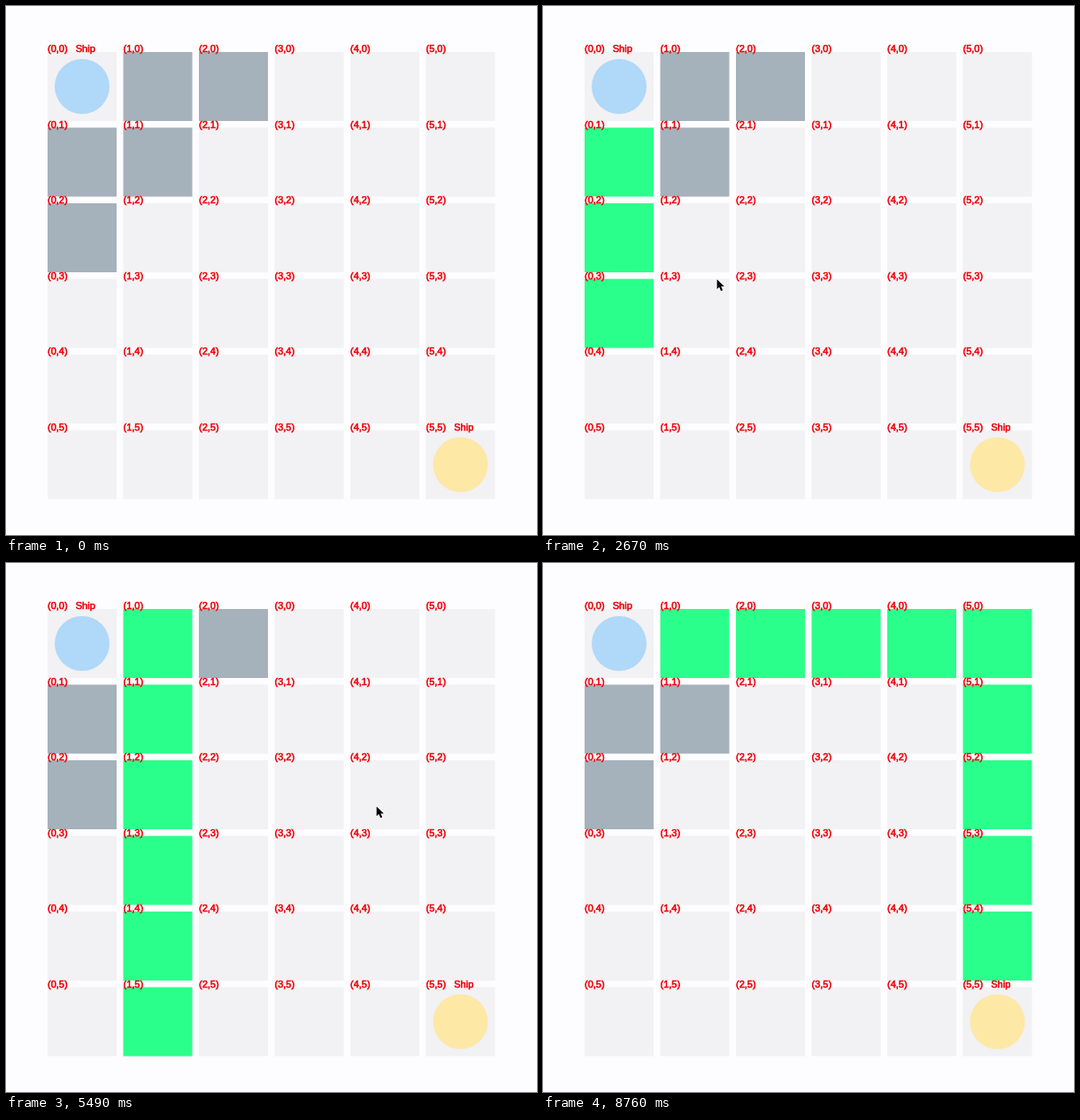
Recreate the animation shown at these times as an HTML page with a canvas. Size 600 by 598 pixels, loop 8.79 s.

```html
<!DOCTYPE html>
<html lang="en">
<head>
<meta charset="utf-8">
<title>Grid path</title>
<style>
  html, body { margin: 0; width: 100%; height: 100%; overflow: hidden; background: #fdfcfe; }
  canvas { display: block; }
</style>
</head>
<body>
<canvas id="stage" width="600" height="598"></canvas>
<script>
const ctx = document.getElementById('stage').getContext('2d');
const LOOP = 8790, COUNT = 6, PITCH = 85.5, SIZE = 78, LEFT = 47, TOP = 52, RANGE = 2;
const COLOR = {
  page: '#fdfcfe', cell: '#f2f1f3', reach: '#a5b2bb', path: '#2bff8b',
  label: '#ee0008', blue: '#b0d8f8', yellow: '#fde8a6'
};
const ships = [
  { col: 0, row: 0, color: COLOR.blue },
  { col: 5, row: 5, color: COLOR.yellow }
];

// Chosen destination: time, column, row
const goals = [
  [0, 0, 0], [1000, 0, 2], [1450, 1, 1], [2300, 0, 3], [3080, 3, 2],
  [4000, 4, 4], [4980, 1, 5], [5950, 5, 1], [7430, 5, 4]
];

// Pointer tip: time, x, y
const pointer = [
  [120, 193, 280], [850, 85, 256], [1080, 85, 256], [1420, 174, 181],
  [1760, 174, 181], [2200, 85, 344], [2430, 85, 344], [2960, 342, 262],
  [3240, 342, 262], [3770, 458, 453], [4220, 458, 453], [4800, 160, 498],
  [5150, 160, 498], [5720, 560, 152], [5900, 513, 169], [6330, 513, 169],
  [6750, 548, 300], [7220, 541, 424], [7600, 541, 424], [8100, 601, 400]
];

const ease = p => p * p * (3 - 2 * p);
const lerp = (a, b, p) => a + (b - a) * p;
const cellX = col => LEFT + col * PITCH;
const cellY = row => TOP + row * PITCH;

function pointerAt(time) {
  const next = pointer.findIndex(key => key[0] > time);
  if (next < 1) return null;
  const [t0, x0, y0] = pointer[next - 1];
  const [t1, x1, y1] = pointer[next];
  const p = ease((time - t0) / (t1 - t0));
  return [lerp(x0, x1, p), lerp(y0, y1, p)];
}

// The route runs along the top row, then down the column of the goal.
function onRoute(col, row, [, toCol, toRow]) {
  if (col + row === 0) return false;
  return (row === 0 && col <= toCol) || (col === toCol && row <= toRow);
}

function cellColor(col, row, goal) {
  if (onRoute(col, row, goal)) return COLOR.path;
  return col + row > 0 && col + row <= RANGE ? COLOR.reach : COLOR.cell;
}

function eachCell(paint) {
  for (let row = 0; row < COUNT; row++)
    for (let col = 0; col < COUNT; col++) paint(col, row);
}

function drawLabel(text, x, y) {
  ctx.fillText(text, x, y);
  ctx.strokeText(text, x, y);
}

function drawPointer([x, y]) {
  ctx.save();
  ctx.translate(x, y);
  ctx.beginPath();
  [[0.5, 0.5], [0.5, 11.5], [3.1, 9.2], [5, 13.6], [7, 12.7], [5.2, 8.5], [8.8, 8.5]]
    .forEach(point => ctx.lineTo(...point));
  ctx.closePath();
  ctx.lineJoin = 'round';
  ctx.lineWidth = 1.6;
  ctx.strokeStyle = '#fff';
  ctx.stroke();
  ctx.fillStyle = '#000';
  ctx.fill();
  ctx.restore();
}

function draw(time) {
  const goal = goals.filter(key => key[0] <= time).pop();
  ctx.fillStyle = COLOR.page;
  ctx.fillRect(0, 0, 600, 598);

  eachCell((col, row) => {
    ctx.fillStyle = cellColor(col, row, goal);
    ctx.fillRect(cellX(col), cellY(row), SIZE, SIZE);
  });

  for (const { col, row, color } of ships) {
    ctx.fillStyle = color;
    ctx.beginPath();
    ctx.arc(cellX(col) + SIZE / 2, cellY(row) + SIZE / 2, 31, 0, Math.PI * 2);
    ctx.fill();
  }

  ctx.font = '11px "Liberation Sans", Arial, sans-serif';
  ctx.fillStyle = ctx.strokeStyle = COLOR.label;
  ctx.lineWidth = 0.6;
  eachCell((col, row) => {
    const ship = ships.some(s => s.col === col && s.row === row);
    drawLabel(`(${col},${row})${ship ? '   Ship' : ''}`, cellX(col), cellY(row));
  });

  const tip = pointerAt(time);
  if (tip) drawPointer(tip);
}

const start = performance.now();
function frame() {
  draw((performance.now() - start) % LOOP);
  requestAnimationFrame(frame);
}
frame();
</script>
</body>
</html>
```
